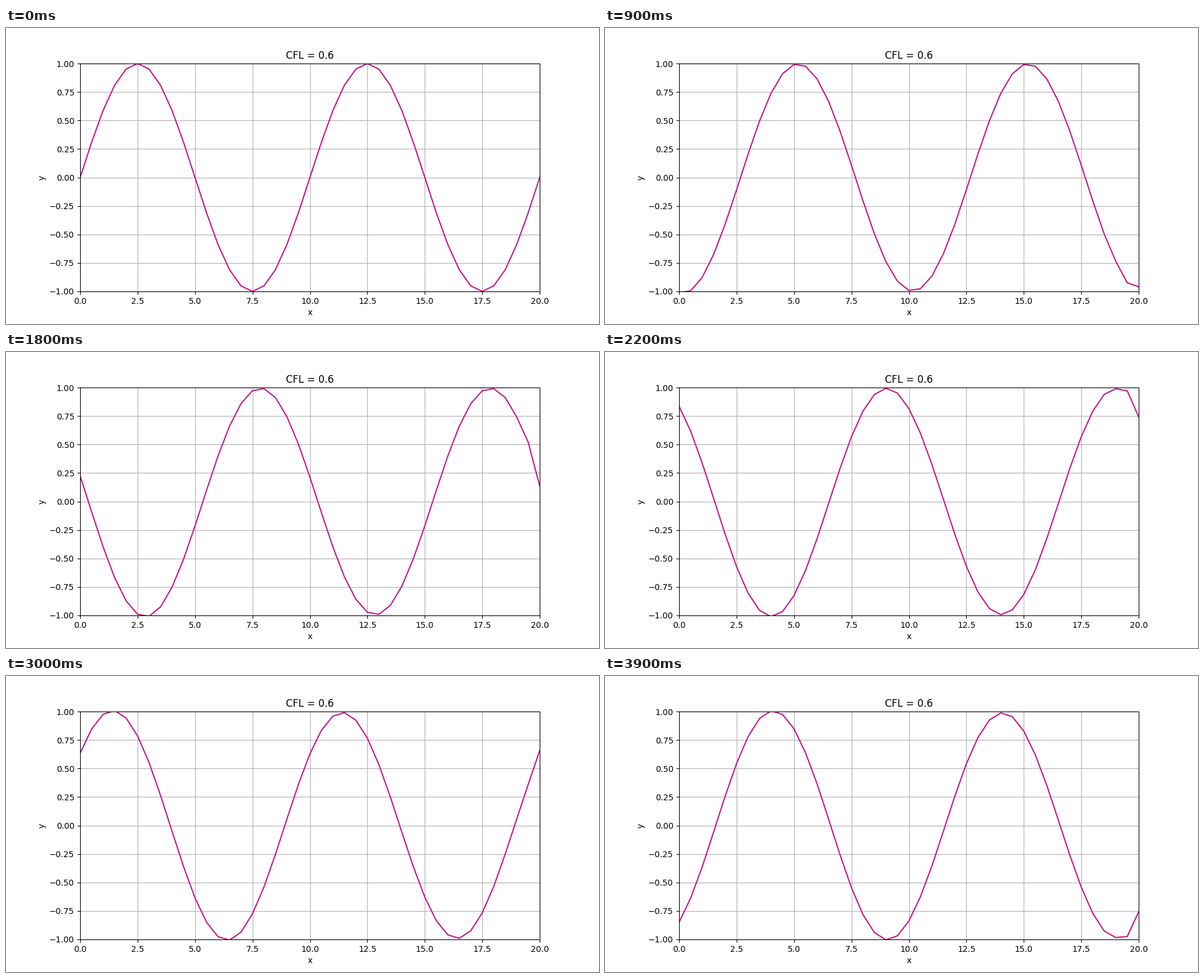
Write a matplotlib script that moves like this. It is 1000 px wide and 500 px high and loops after 4000 ms.

```python
import numpy as np
import matplotlib.pyplot as plt
from matplotlib.animation import FuncAnimation

CFL = 0.6
FRAMES = 40
INTERVAL = 100  # ms

x = np.linspace(0, 20, 41)


def lax_wendroff_step(y):
    """Advance the advection equation once, wrapping at the domain ends."""
    left = np.append(y[-2], y[:-1])
    right = np.append(y[1:], y[0])
    return y - CFL / 2 * (right - left) + CFL**2 / 2 * (right - 2 * y + left)


states = [np.sin(2 * np.pi * x / 10)]
for _ in range(FRAMES - 1):
    states.append(lax_wendroff_step(states[-1]))

plt.rcParams["font.family"] = "DejaVu Sans"
fig, ax = plt.subplots(figsize=(10, 5), dpi=100)
line, = ax.plot(x, states[0], color="mediumvioletred", linewidth=1.5)
ax.set(xlim=(0, 20), ylim=(-1, 1), xlabel="x", ylabel="y",
       title=f"CFL = {CFL}")
ax.grid(True)


def update(frame):
    line.set_ydata(states[frame])
    return line,


anim = FuncAnimation(fig, update, frames=FRAMES, interval=INTERVAL, repeat=True)
plt.show()
```
